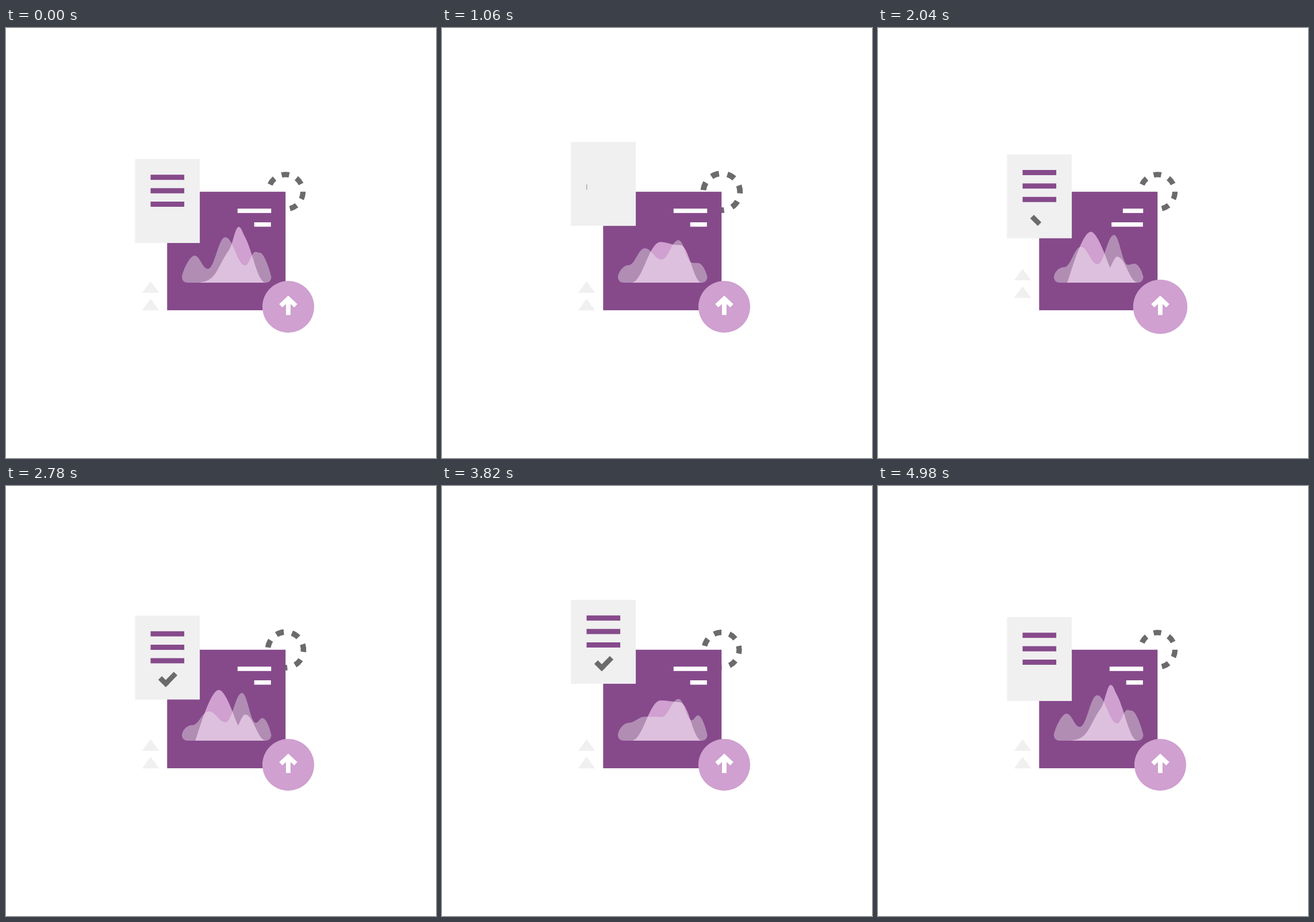
Animation of 748x748 px, one loop 5 s. Source, as an HTML page with a canvas:

```html
<!DOCTYPE html>
<html lang="en">
<head>
<meta charset="utf-8">
<title>Report upload</title>
<style>
html, body { margin: 0; width: 100%; height: 100%; overflow: hidden; background: #fff; }
canvas { display: block; width: 100vmin; height: 100vmin; }
</style>
</head>
<body>
<canvas id="stage" width="748" height="748"></canvas>
<script>
const ctx = document.getElementById('stage').getContext('2d');
const LOOP = 5000, HALF = LOOP / 2;
const PURPLE = '#864a8b', LILAC = '#cfa0d0', PALE = '#f0f0f0', GREY = '#6b6b6b', WHITE = '#fff';

const lerp = (a, b, w) => a + (b - a) * w;
const ease = (t, from, to) => {
  const x = Math.min(1, Math.max(0, (t - from) / (to - from)));
  return x * x * (3 - 2 * x);
};
// Eases up between a and b, then back down between c and d.
const pulse = (t, a, b, c, d) => ease(t, a, b) - ease(t, c, d);

function rect(x, y, w, h, color) {
  ctx.fillStyle = color;
  ctx.fillRect(x, y, w, h);
}

function line(width, color, ...points) {
  ctx.lineWidth = width;
  ctx.strokeStyle = color;
  ctx.beginPath();
  points.forEach(([x, y]) => ctx.lineTo(x, y));
  ctx.stroke();
}

// Chart key points: x, y and an optional roundness.
const ROUND = 0.4;
const hills = [[328, 396], [351, 419], [381.5, 364], [416, 413], [434, 389.5], [442, 391]];
const peaks = [[324, 416], [353, 376], [382, 411], [410.5, 360], [434.5, 412], [446, 412.5]];
const summit = [[330, 443, 0.65], [388, 386, ROUND], [405, 346, ROUND], [415, 362, ROUND], [452, 443, ROUND]];
const twins = [[329, 443, 0], [369, 352.5, ROUND], [404, 421, 0.05], [416, 400, ROUND], [452, 443, ROUND]];

const morph = (a, b, w) => a.map((p, i) => p.map((v, k) => lerp(v, b[i][k], w)));

// Smooth curve: level at crests and dips, sloped where it keeps climbing or falling.
function curve(points) {
  const grade = i => (points[i + 1][1] - points[i][1]) / (points[i + 1][0] - points[i][0]);
  const slope = i => {
    if (i === 0 || i === points.length - 1) return 0;
    const a = grade(i - 1), b = grade(i);
    return a * b > 0 ? 2 * a * b / (a + b) : 0;
  };
  for (let i = 1; i < points.length; i++) {
    const [x0, y0, k0 = ROUND] = points[i - 1];
    const [x, y, k = ROUND] = points[i];
    const d0 = (x - x0) * k0, d = (x - x0) * k;
    ctx.bezierCurveTo(x0 + d0, y0 + d0 * slope(i - 1), x - d, y - d * slope(i), x, y);
  }
}

function drawFront(t) {
  const points = morph(summit, twins, pulse(t, 0, 2400, 2400, 4880));
  ctx.beginPath();
  ctx.moveTo(points[0][0], points[0][1]);
  curve(points);
  ctx.fillStyle = LILAC;
  ctx.fill();
}

function drawBack(t) {
  const points = morph(hills, peaks, pulse(t, 0, 1440, 3400, 4880));
  const settle = pulse(t, 1440, 3400, 3400, 4880);
  points[1][1] += 21 * settle;
  points[5][1] -= 11.5 * settle;
  const [x0, y0] = points[0], [x1, y1] = points[5];
  const left = 306, right = 461.5, side = 433, base = 443;
  ctx.beginPath();
  ctx.moveTo(left, side);
  ctx.bezierCurveTo(left + 1, side - 9, x0 - 9, y0, x0, y0);
  curve(points);
  ctx.bezierCurveTo(x1 + 7, y1, right - 2, side - 10, right, side);
  ctx.bezierCurveTo(right, side + 6, right - 4, base, right - 10, base);
  ctx.lineTo(left + 10, base);
  ctx.bezierCurveTo(left + 4, base, left, side + 6, left, side);
  ctx.fillStyle = 'rgba(240,240,240,0.4)';
  ctx.fill();
}

function drawRing(t) {
  const p = t % HALF, turn = 1485;
  const scale = 1 + 0.1 * pulse(p, 0, turn / 2, turn / 2, turn);
  const step = Math.PI * 2 / 7, half = 0.218;
  ctx.save();
  ctx.translate(486.5, 285);
  ctx.scale(scale, scale);
  ctx.rotate(Math.PI * (2 * ease(p, 0, turn) - 0.505));
  ctx.strokeStyle = GREY;
  ctx.lineWidth = 9.3;
  for (let i = 0; i < 7; i++) {
    ctx.beginPath();
    ctx.arc(0, 0, 30.1, i * step - half, i * step + half);
    ctx.stroke();
  }
  ctx.restore();
}

function drawPanel(t) {
  rect(280.3, 284.8, 206, 206.2, PURPLE);
  const top = lerp(58.5, 29, pulse(t, 1120, 1420, 1930, 2300));
  const low = lerp(29, 58.5, pulse(t, 1290, 1620, 1950, 2350));
  rect(461.3 - top, 314.2, top, 7.6, WHITE);
  rect(460.8 - low, 338, low, 7.6, WHITE);
  drawFront(t);
  drawBack(t);
}

function stroke(x, y, dx, dy, w) {
  if (w > 0) line(8.8, GREY, [x, y], [x + dx * w, y + dy * w]);
}

function drawSheet(t) {
  ctx.save();
  ctx.translate(0, 228 - 30 * pulse(t % HALF, 100, 1110, 1320, 2420));
  rect(224.4, 0, 112.7, 146, PALE);
  for (let i = 0; i < 3; i++) {
    const wiped = ease(t, 640 + i * 80, 920 + i * 80);
    const typed = ease(t, 1110 + i * 140, 1440 + i * 140);
    rect(251.5, 27.2 + i * 23.4, 58.6 * (1 - wiped + typed), 9, PURPLE);
  }
  stroke(268, 108.4, 13, 12.9, pulse(t, 1860, 2030, 4620, 4760));
  stroke(278, 118.2, 17, -17.4, pulse(t, 2040, 2260, 4440, 4620));
  ctx.restore();
}

function drawTriangles(t) {
  const lift = 23 * pulse(t, 1800, 2080, 2120, 2400);
  ctx.fillStyle = PALE;
  for (const top of [440.5, 471]) {
    ctx.beginPath();
    ctx.moveTo(251.5, top - lift);
    ctx.lineTo(266.5, top + 20.3 - lift);
    ctx.lineTo(236.7, top + 20.3 - lift);
    ctx.fill();
  }
}

function drawButton(t) {
  const p = t < HALF ? t - 1100 : t - 3275;
  const y = 485 - 5 * pulse(p, 0, 260, 260, 520);
  const r = 45 + 5 * pulse(t, 1940, 2160, 2180, 2420);

  // The arrow leaves through the top and returns from below.
  let shift = 0;
  if (p > 0 && p < 180) shift = -66 * (p / 180) ** 2;
  else if (p >= 180) shift = 66 * (1 - ease(p, 110, 320));

  ctx.save();
  ctx.beginPath();
  ctx.arc(491, y, r, 0, Math.PI * 2);
  ctx.fillStyle = LILAC;
  ctx.fill();
  ctx.clip();
  ctx.translate(491, 471 + shift);
  line(7.9, WHITE, [-13.1, 12.1], [0, 0], [13.1, 12.1]);
  line(7.9, WHITE, [0, 0], [0, 28.3]);
  ctx.restore();
}

function draw(t) {
  rect(0, 0, 748, 748, WHITE);
  drawRing(t);
  drawTriangles(t);
  drawPanel(t);
  drawSheet(t);
  drawButton(t);
}

function tick() {
  draw(performance.now() % LOOP);
  requestAnimationFrame(tick);
}
tick();
</script>
</body>
</html>
```
